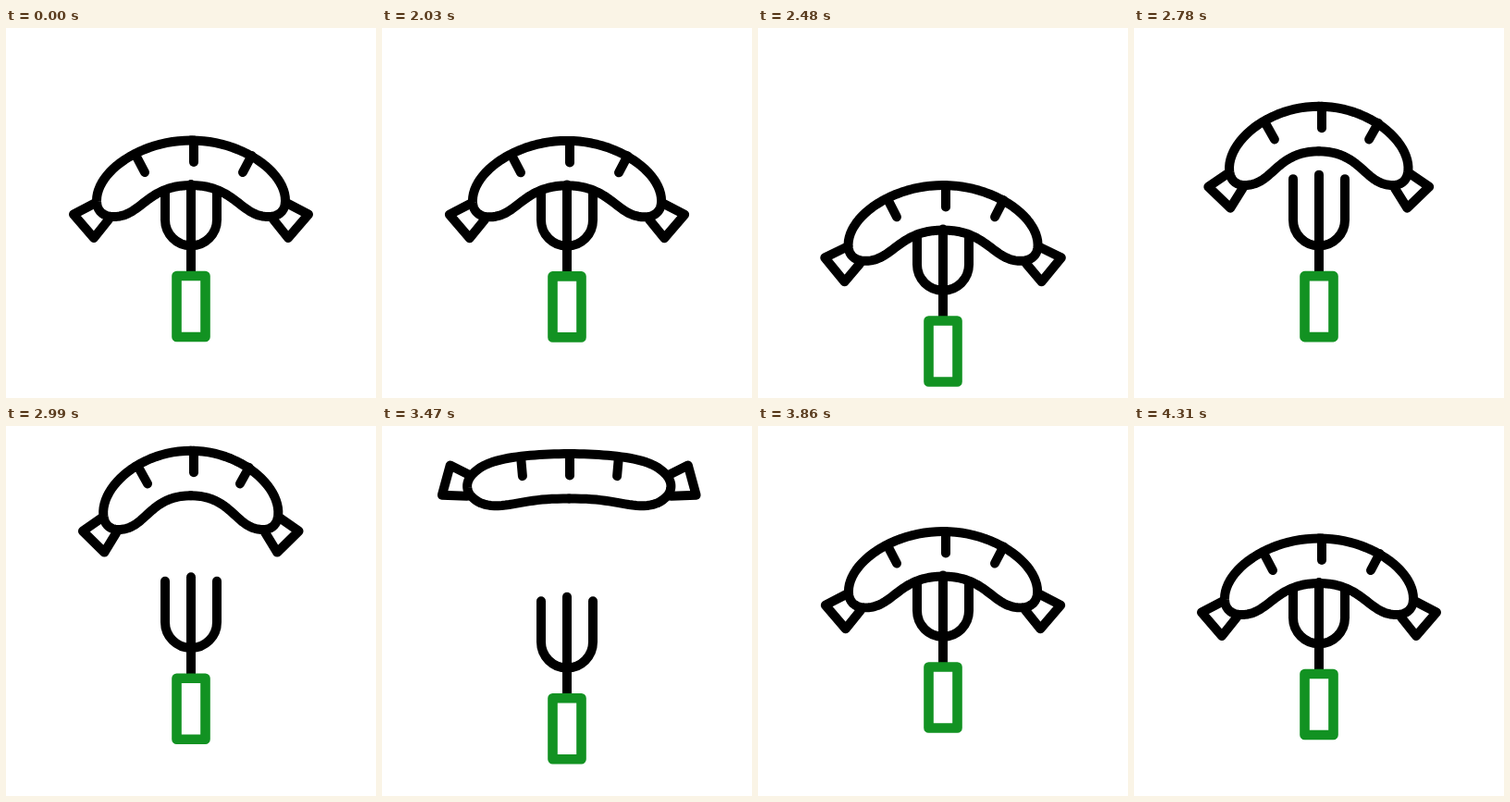
Recreate the animation shown at these times as an HTML page with a canvas. Size 400 px wide and 400 px high, loop 4370 ms.

```html
<!DOCTYPE html>
<html lang="en">
<head>
<meta charset="utf-8">
<title>Sausage toss</title>
<style>
html, body { margin: 0; width: 100%; height: 100%; overflow: hidden; background: #fff; }
canvas { display: block; width: 400px; height: 400px; }
</style>
</head>
<body>
<canvas id="stage" width="400" height="400"></canvas>
<script>
const ctx = document.getElementById('stage').getContext('2d');
const LOOP = 4370, STEP = 30, BLACK = '#000', GREEN = '#129222';
const START = 2000, LAUNCH = 2540, PEAK = 3210, CATCH = 3850, END = 4310;
const LOW = 50, HIGH = -105, CAUGHT = -7;

// Resting right half of the sausage, measured from the middle of its top line
const body = [
  [[0, 0], [55, 0], [102, 34], [102, 65]],
  [[102, 65], [102, 77], [94, 82.5], [84, 82.5]],
  [[84, 82.5], [54, 83], [48, 48.5], [0, 48.5]]
];
const tail = [[105, 68.5], [127, 80], [105, 105.5], [89, 85.5]];
const cut = [[62.5, 16.5], [53, 34.5]];
const LOWER_EDGE = 48.5, SPINE = 26, RADIUS = 125;

const unit = (t, from, to) => Math.min(1, Math.max(0, (t - from) / (to - from)));
const mix = (a, b, u) => a + (b - a) * u;
const swing = u => 0.5 - 0.5 * Math.cos(Math.PI * u);

// Swings from stop to stop, each given as [ms, value]
function swingThrough(stops, t) {
  let value = stops[0][1];
  for (let i = 1; i < stops.length; i++) {
    value = mix(value, stops[i][1], swing(unit(t, stops[i - 1][0], stops[i][0])));
  }
  return value;
}

const forkAt = t => swingThrough(
  [[START, 0], [LAUNCH, LOW], [2740, 0], [3720, 31], [3880, -9], [END, 0]], t);

// Curl is 1 at rest, 0 when straight
const curlAt = t => swingThrough(
  [[START, 1], [2310, 0.85], [LAUNCH, 1], [2720, 1.1], [3000, 1.1],
    [3640, -0.1], [3870, 1], [4090, 0.93], [END, 1]], t);

function sausageAt(t) {
  if (t < LAUNCH || t >= CATCH) return forkAt(t);
  if (t < PEAK) {
    const u = unit(t, LAUNCH, PEAK);
    return mix(LOW, HIGH, 1 - (1 - u ** 1.5) ** 3.4);
  }
  return mix(HIGH, CAUGHT, unit(t, PEAK, CATCH) ** 2.2);
}

const squeezeAt = t => 1 - 0.06 * Math.sin(Math.PI * unit(t, 2560, 3800));

// Rolls a point off the resting arc and onto an arc of another curvature
function bender(curl, squeeze) {
  const radius = RADIUS / (curl || 1e-6);
  return ([x, y]) => {
    const down = SPINE + RADIUS - y;
    const along = RADIUS * Math.atan2(x, down);
    const depth = RADIUS - Math.hypot(x, down);
    const angle = along / radius, reach = radius - depth;
    return [squeeze * reach * Math.sin(angle),
      SPINE + depth + 2 * reach * Math.sin(angle / 2) ** 2];
  };
}

function cubic([a, b, c, d], u) {
  const v = 1 - u;
  return [0, 1].map(i =>
    v * v * v * a[i] + 3 * v * v * u * b[i] + 3 * v * u * u * c[i] + u * u * u * d[i]);
}

function line(points) {
  ctx.beginPath();
  points.forEach(([x, y]) => ctx.lineTo(x, y));
  ctx.stroke();
}

function drawFork(y, lowerEdge) {
  const tip = Math.max(158.5 + y, lowerEdge - 1);
  const side = Math.max(163 + y, lowerEdge + 6);
  ctx.lineWidth = 10;
  ctx.strokeStyle = BLACK;
  line([[200, tip], [200, 264 + y]]);
  ctx.beginPath();
  ctx.moveTo(172, side);
  ctx.arc(200, 207.3 + y, 28, Math.PI, 0, true);
  ctx.lineTo(228, side);
  ctx.stroke();
  ctx.lineWidth = 10.6;
  ctx.strokeStyle = GREEN;
  ctx.strokeRect(184.5, 268 + y, 31, 66);
}

function drawSausage(top, curl, squeeze) {
  const bend = bender(curl, squeeze);
  const outline = body.flatMap(part =>
    Array.from({ length: 25 }, (_, i) => cubic(part, i / 24)));
  const center = 200 + 2.5 * (1 - curl);
  ctx.lineWidth = 10;
  ctx.strokeStyle = BLACK;
  for (const side of [-1, 1]) {
    const place = (points, middle) => points.map(bend).map(
      ([x, y]) => [middle + side * x, top + y]);
    line(place(outline, center));
    line(place(tail, center));
    line(place(cut, 203));
  }
  line([[203, top], [203, top + 23.5]]);
}

function draw(now) {
  const time = now % LOOP;
  const t = time < 2030 ? 0 : Math.min(END, 2030 + Math.floor((time - 2030) / STEP) * STEP);
  const top = 121.5 + sausageAt(t);

  ctx.fillStyle = '#fff';
  ctx.fillRect(0, 0, 400, 400);
  ctx.lineCap = ctx.lineJoin = 'round';
  drawFork(forkAt(t), top + LOWER_EDGE);
  drawSausage(top, curlAt(t), squeezeAt(t));
}

const start = performance.now();
function tick() {
  draw(performance.now() - start);
  requestAnimationFrame(tick);
}
tick();
</script>
</body>
</html>
```
